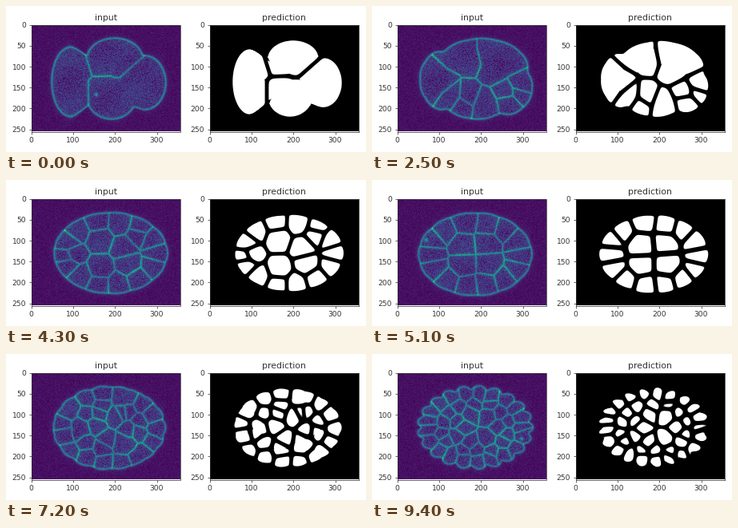
Write a matplotlib script that moves like this. It is 450 px wide and 183 px high and loops after 9.5 s.

```python
import matplotlib.pyplot as plt
import numpy as np
from matplotlib.animation import FuncAnimation

W, H = 450, 183
PW, PH = 186, 134          # panel size in pixels
FRAMES = 95
INK = "0.2"
ANGLES = np.linspace(-np.pi, np.pi, 360, endpoint=False)
MID = np.array([97, 69])
rng = np.random.default_rng(4)


def outline(lobes):
    """Radius of the union of ellipses (cx, cy, a, b) for every angle."""
    r = np.arange(0, 100, 0.25)
    x = MID[0] + r * np.cos(ANGLES)[:, None]
    y = MID[1] + r * np.sin(ANGLES)[:, None]
    inside = np.zeros(x.shape, bool)
    for cx, cy, a, b in lobes:
        inside |= ((x - cx) / a) ** 2 + ((y - cy) / b) ** 2 < 1
    curve = np.where(inside, r, 0).max(1)
    kernel = np.hanning(11)
    padded = np.r_[curve[-5:], curve, curve[:5]]
    return np.convolve(padded, kernel / kernel.sum(), "valid")


class Stage:
    def __init__(self, time, lobes, seeds, spot, groups=None):
        self.time, self.spot = time, spot
        self.curve = outline(lobes)
        self.seeds = np.array(seeds, float)
        n = len(self.seeds)
        self.shrink = rng.uniform(-0.4, 0.9, n)
        self.groups = np.arange(n) if groups is None else np.array(groups)
        self.splits = rng.uniform(0.15, 0.85, n)


def ring_stage(time, ellipse, counts, bulge, spot):
    """Cells on concentric rings, the outer ones bulging the outline."""
    cx, cy, a, b = ellipse
    seeds = []
    for i, n in enumerate(counts):
        rho = 0.8 - 0.72 * i / (len(counts) - 0.4)
        t = 2 * np.pi * (np.arange(n) + 0.5 * (i % 2)) / n
        ring = np.c_[cx + a * rho * np.cos(t), cy + b * rho * np.sin(t)]
        seeds.append(ring + rng.normal(0, 2, ring.shape))
    stage = Stage(time, [ellipse], np.vstack(seeds), spot)
    t = np.arctan2(np.sin(ANGLES) / b, np.cos(ANGLES) / a)
    stage.curve += bulge * (np.abs(np.cos(counts[0] * t / 2)) - 0.7)
    return stage


STAGES = [
    Stage(0, [(49, 72, 24, 44), (104, 43, 35, 26), (100, 88, 32, 31), (142, 73, 26, 34)],
          [(50, 50), (52, 92), (88, 38), (114, 40), (90, 92), (112, 94), (137, 66)],
          (81, 88), groups=[0, 0, 1, 1, 2, 2, 2]),
    Stage(15, [(50, 72, 25, 37), (108, 50, 50, 32), (98, 90, 38, 31), (144, 88, 25, 28)],
          [(48, 72), (85, 42), (125, 44), (80, 90), (113, 94), (147, 90)], (84, 69)),
    ring_stage(35, (101, 67, 71, 50), (13, 5, 1), 1, (44, 60)),
    ring_stage(51, (97, 70, 71, 52), (14, 4), 1, (36, 52)),
    ring_stage(64, (97, 70, 70, 52), (15, 9, 4), 2, (74, 34)),
    ring_stage(81, (97, 69, 70, 52), (18, 12, 6, 1), 3, (137, 109)),
    ring_stage(94, (97, 69, 71, 51), (21, 14, 7, 1), 5, (155, 83)),
]


def link(a, b):
    """Pair each cell with its nearest parent; leftover parents merge."""
    dist = np.linalg.norm(a.seeds[:, None] - b.seeds[None], axis=2)
    parent = dist.argmin(0)
    lost = np.setdiff1d(np.arange(len(a.seeds)), parent)
    start = np.r_[parent, lost]
    end = np.r_[np.arange(len(b.seeds)), dist[lost].argmin(1)]
    return start, end


LINKS = [link(a, b) for a, b in zip(STAGES, STAGES[1:])]

X, Y = np.meshgrid(np.arange(PW) + 0.5, np.arange(PH) + 0.5)
THETA = np.arctan2(Y - MID[1], X - MID[0])
RADIUS = np.hypot(X - MID[0], Y - MID[1])
GRAIN = rng.normal(0, 1, (PH, PW))
PATCHY = np.sin(X / 13 + 1) * np.sin(Y / 11 + X / 40)


def edge_distance(curve):
    r = np.interp(THETA, ANGLES, curve, period=2 * np.pi)
    step = ANGLES[1] - ANGLES[0]
    slope = (np.roll(curve, -2) - np.roll(curve, 2)) / (4 * step)
    tilt = np.interp(THETA, ANGLES, slope / curve, period=2 * np.pi)
    return (r - RADIUS) / np.sqrt(1 + tilt ** 2)


def cell_state(frame):
    k = max(i for i, s in enumerate(STAGES[:-1]) if s.time <= frame)
    a, b = STAGES[k], STAGES[k + 1]
    u = (frame - a.time) / (b.time - a.time)
    start, end = LINKS[k]
    seeds = (1 - u) * a.seeds[start] + u * b.seeds[end]
    shrink = (1 - u) * a.shrink[start] + u * b.shrink[end]
    group = a.groups[start]
    labels = np.where(u < a.splits[group], group, 1000 + b.groups[end])
    return seeds, shrink, labels, (1 - u) * a.curve + u * b.curve


def wall_distances(px, py, seeds, labels):
    """Distance of each pixel to the border with every other cell."""
    sx, sy = seeds.astype("f4").T[:, :, None]
    power = (px - sx) ** 2 + (py - sy) ** 2
    own = power.argmin(0)
    gap = np.linalg.norm(seeds[:, None] - seeds[None], axis=2)
    same = labels[:, None] == labels[None]
    scale = np.where(same, 0, 0.5 / np.maximum(gap, 1e-3)).astype("f4")
    far = np.where(same, 99, 0).astype("f4")
    return (power - power.min(0)) * scale[:, own] + far[:, own], own


def render(frame):
    seeds, shrink, labels, curve = cell_state(frame)
    edge = edge_distance(curve)
    inside = edge > -1
    dist, own = wall_distances(X[inside].astype("f4"), Y[inside].astype("f4"),
                               seeds, labels)
    wall = np.full((PH, PW), 99.0)
    wall[inside] = dist.min(0)

    # Soft minimum rounds the corners of the predicted cells
    soft = 1.2
    rim = np.exp(-(edge[inside] - 0.8) / soft)
    total = np.exp(-dist / soft).sum(0) + rim
    age = frame / FRAMES
    margin = 2.4 - 0.4 * age + age * shrink[own]
    mask = np.zeros((PH, PW))
    mask[inside] = np.clip(0.5 - soft * np.log(total) - margin, 0, 1)

    body = np.clip(edge + 0.5, 0, 1)
    near = np.minimum(wall, np.abs(edge))
    noise = np.random.default_rng(frame).normal(0, 1, (PH, PW))
    img = 0.04 + 0.02 * GRAIN
    img += body * (0.1 + 0.03 * PATCHY + 0.05 * noise)
    img += (0.27 - 0.05 * age) * np.exp(-(edge / 1.3) ** 2)
    img += body * (0.27 + 0.08 * PATCHY) * np.exp(-(wall / 1.2) ** 2)
    img += 0.08 * np.exp(-near / 2.5)
    for s in STAGES:
        fade = max(0, 1 - abs(frame - s.time) / 7)
        x, y = s.spot
        img += 0.4 * fade * np.exp(-((X - x) ** 2 + (Y - y) ** 2) / 5)
    return np.clip(img, 0, 1), mask


def panel(left, title, cmap):
    ax = fig.add_axes([left / W, 25.5 / H, PW / W, PH / H])
    image = ax.imshow(np.zeros((PH, PW)), cmap=cmap, vmin=0, vmax=1,
                      extent=(-0.5, 355.5, 255.5, -0.5), aspect="auto",
                      interpolation="nearest")
    ax.set_title(title, fontsize=7.85, pad=4, color=INK)
    ax.set_xticks(range(0, 301, 100))
    ax.set_yticks(range(0, 251, 50))
    ax.tick_params(labelsize=6.55, length=2.3, width=0.53, pad=2.3,
                   color=INK, labelcolor=INK)
    for spine in ax.spines.values():
        spine.set(linewidth=0.53, color=INK)
    return image


plt.rcParams["font.family"] = "DejaVu Sans"
fig = plt.figure(figsize=(W / 100, H / 100), dpi=100, facecolor="white")
scan = panel(31.5, "input", "viridis")
guess = panel(254.5, "prediction", "gray")


def update(frame):
    img, mask = render(frame)
    scan.set_data(img)
    guess.set_data(mask)
    return scan, guess


anim = FuncAnimation(fig, update, frames=FRAMES, interval=100,
                     init_func=lambda: update(0), repeat=True, repeat_delay=0)
plt.show()
```
